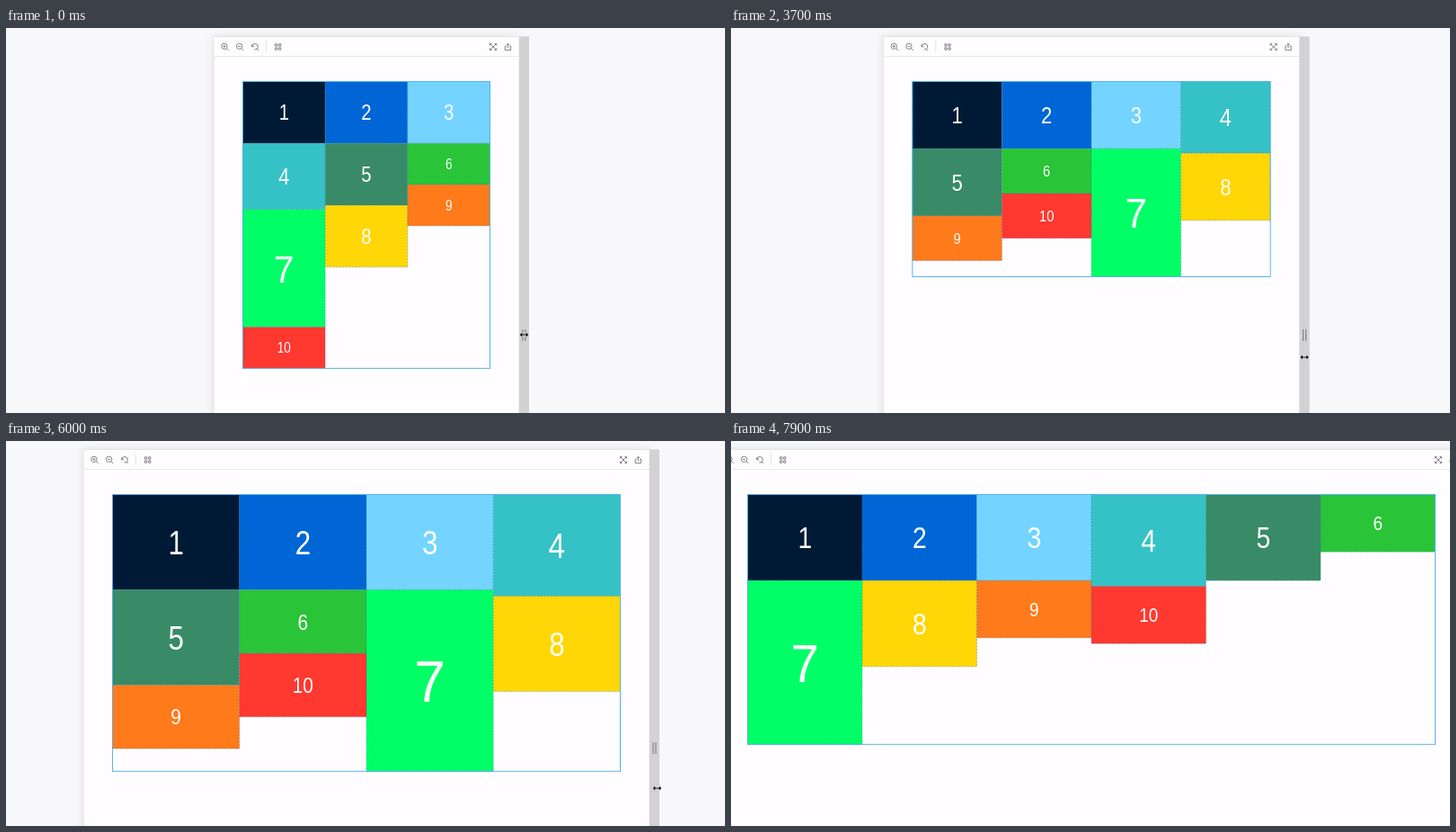
An HTML page for the animation above (8 s loop, 800 by 428 pixels).

```html
<!DOCTYPE html>
<html lang="en">
<head>
<meta charset="utf-8">
<title>Responsive masonry grid</title>
<style>
  html, body { margin: 0; width: 100%; height: 100%; overflow: hidden; background: #f8f7fa; }
  svg { display: block; width: 800px; height: 428px; }
  text { fill: #fff; text-anchor: middle; font-family: "Liberation Sans", Arial, sans-serif; }
  .panel { fill: #fffdff; stroke: #e4e3e6; filter: drop-shadow(0 0 5px rgba(0, 0, 0, .09)); }
  .bar { stroke: #e9e8ea; }
  .handle { fill: #d2d1d3; }
  .grip { stroke: #77767a; }
  .icon { fill: none; stroke: #848387; stroke-width: 1; }
  .tile { stroke: rgba(40, 125, 175, .5); stroke-width: .8; stroke-dasharray: 2 1.5; }
  .frame { fill: none; stroke: #59b2ea; }
  .cursor { fill: #000; stroke: #fff; stroke-width: .5; }
</style>
</head>
<body>
<svg viewBox="0 0 800 428">
  <rect class="panel" y="9.5" height="460"/>
  <line class="bar" y1="31.5" y2="31.5"/>
  <g id="left" class="icon">
    <g id="zoom"><circle cx="12" cy="20.3" r="3.2"/><path d="M14.4 22.7l2.3 2.3M10.4 20.3h3.2"/></g>
    <path d="M12 18.7v3.2"/>
    <use href="#zoom" x="16.6"/>
    <path d="M42.6 18.2v2.6h2.6M43 20.2a3.2 3.2 0 1 1 2.4 3.6M47.6 22.7l2.3 2.3"/>
    <path d="M58.5 14v13" stroke="#e2e1e4"/>
    <path d="M68.5 17.8h2.3v2.3h-2.3zM72.6 17.8h2.3v2.3h-2.3zM68.5 21.9h2.3v2.3h-2.3zM72.6 21.9h2.3v2.3h-2.3z"/>
  </g>
  <g id="right" class="icon">
    <path d="M-32.6 19.6v-2.1h2.1M-27.5 17.5h2.1v2.1M-25.4 22.4v2.1h-2.1M-30.5 24.5h-2.1v-2.1M-32.4 17.7l6.8 6.6M-25.6 17.7l-6.8 6.6"/>
    <path d="M-14.2 20.2h-1.6v4.4h6.4v-4.4h-1.6M-12.6 22.4v-5M-14.4 19l1.8-1.8 1.8 1.8"/>
  </g>
  <g id="tiles"></g>
  <rect class="frame" y="59.5"/>
  <g id="handle">
    <rect class="handle" y="9.5" width="11" height="420"/>
    <path class="grip" d="M4 335v13M7 335v13"/>
  </g>
  <path id="cursor" class="cursor" d="M-5 0l3-3v2.2h4v-2.2l3 3-3 3v-2.2h-4v2.2z"/>
</svg>
<script>
const LOOP = 8000, STEP = 100, MID = 401, PAD = 32.5, TOP = 59.5;

// fill colour and height relative to the column width
const items = [
  ['#001a35', .75], ['#0066d6', .75], ['#74d4ff', .75], ['#35c2c6', .8], ['#388b66', .75],
  ['#2ac438', .5], ['#00ff66', 10 / 7], ['#ffd606', .75], ['#ff7a1a', .5], ['#ff3830', .5]
];

// [time, value] tracks
const halfWidth = [[0, 170], [900, 170], [1800, 174], [2700, 203], [2800, 205], [3600, 228],
  [4500, 264.5], [5400, 281.5], [6000, 315], [6300, 343], [7000, 398.5], [7900, 415]];
const cursorY = [[0, 341], [900, 341], [1800, 344], [2800, 356], [4500, 374], [6000, 386], [7900, 400]];
const cursorLag = [[0, 0], [4500, 0], [6000, 3], [7900, 6]];

// Monotone cubic interpolation along a track
function sample(track, t) {
  const last = track.length - 1;
  if (t >= track[last][0]) return track[last][1];
  const slope = i => (track[i + 1][1] - track[i][1]) / (track[i + 1][0] - track[i][0]);
  const tangent = i => {
    if (i === 0) return slope(0);
    if (i === last) return slope(last - 1);
    const a = slope(i - 1), b = slope(i);
    return a * b > 0 ? 2 * a * b / (a + b) : 0;
  };
  let i = 0;
  while (t >= track[i + 1][0]) i++;
  const [t0, a] = track[i], [t1, b] = track[i + 1];
  const d = t1 - t0, u = (t - t0) / d, v = 1 - u;
  return a * (1 + 2 * u) * v * v + b * u * u * (3 - 2 * u)
    + d * u * v * (tangent(i) * v - tangent(i + 1) * u);
}

const $ = s => document.querySelector(s);
const set = (el, attrs) => { for (const k in attrs) el.setAttribute(k, attrs[k]); };
const move = (el, x, y = 0) => set(el, { transform: `translate(${x} ${y})` });
const add = (name, attrs) => {
  const el = document.createElementNS('http://www.w3.org/2000/svg', name);
  set(el, attrs);
  return $('#tiles').appendChild(el);
};

const tiles = items.map(([fill, ratio], i) => {
  const box = add('rect', { class: 'tile', fill });
  const label = add('text', {});
  label.textContent = i + 1;
  return { box, label, ratio };
});
const panel = $('.panel'), bar = $('.bar'), frame = $('.frame');
const left = $('#left'), right = $('#right'), handle = $('#handle'), cursor = $('#cursor');

const columnCount = width => width < 432 ? 3 : width < 810 ? 4 : 6;

function layout(x, width, cols) {
  const col = width / cols;
  const ends = Array(cols).fill(TOP);
  tiles.forEach(({ box, label, ratio }, i) => {
    const c = i % cols, h = col * ratio, y = ends[c], tall = ratio > 1;
    const size = h * (tall ? .325 : .34);
    set(box, { x: x + c * col, y, width: col, height: h });
    set(label, {
      'font-size': size,
      transform: `translate(${x + (c + .5) * col} ${y + h / 2 + size * .365}) scale(${tall ? .95 : .87} 1)`
    });
    ends[c] += h;
  });
  set(frame, { x, width, height: Math.max(...ends) - TOP });
}

function draw(t) {
  const half = sample(halfWidth, t), x = MID - half, end = MID + half;
  set(panel, { x, width: half * 2 });
  set(bar, { x1: x, x2: end });
  move(left, x);
  move(right, end);
  move(handle, end);
  move(cursor, end + 5.5 + sample(cursorLag, t), sample(cursorY, t));
  layout(x + PAD, (half - PAD) * 2, columnCount(half * 2));
}

const start = performance.now();
function tick() {
  const t = (performance.now() - start) % LOOP;
  draw(Math.floor(t / STEP) * STEP);
  requestAnimationFrame(tick);
}
tick();
</script>
</body>
</html>
```
